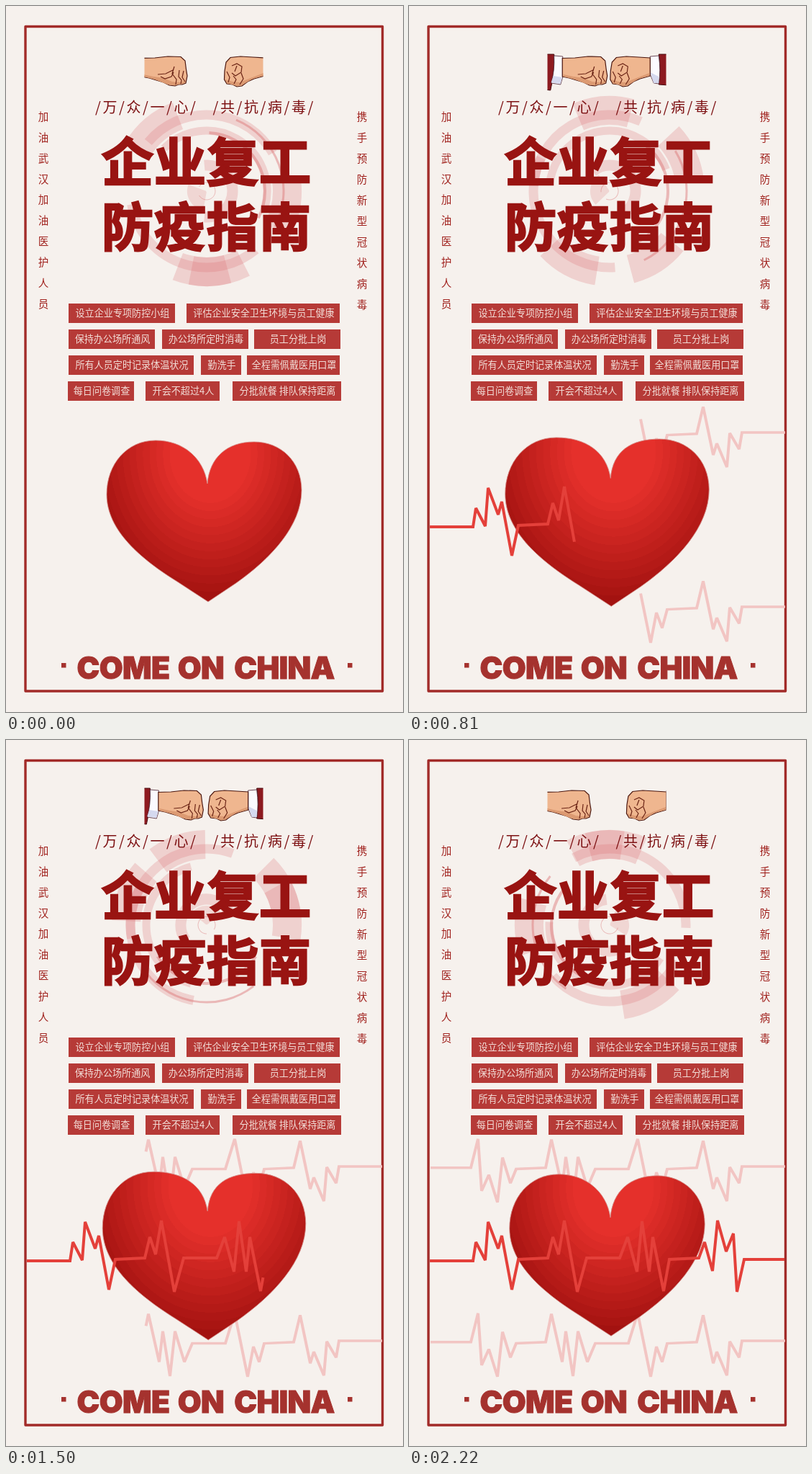
Write an HTML page that moves like this. It is 552 px wide and 980 px high and loops after 2.25 s.

```html
<!DOCTYPE html>
<html lang="zh-CN">
<head>
<meta charset="utf-8">
<style>
html,body{margin:0;width:100%;height:100%;overflow:hidden;background:#f6f1ed}
svg{display:block;width:100vw;height:100vh}
text{font-family:"Noto Sans CJK SC","Noto Sans CJK","Noto Sans SC",sans-serif;text-anchor:middle;white-space:pre}
#title text{font-size:72px;font-weight:900;fill:#991412;stroke:#991412;stroke-width:2.6}
#slogan text{font-size:20px;fill:#7d1012}
#sides text{font-size:14.5px;fill:#a0211d}
#tags rect{fill:#b63a37}
#tags text{font-size:13.1px;font-weight:300;fill:#f3dfd9}
#foot{fill:#a5322e}
#foot text{font:900 42.5px Inter,Roboto,sans-serif;letter-spacing:-.6px;stroke:#a5322e;stroke-width:1}
#rings path{fill:none;stroke:#d86a6c}
.skin{fill:#efb68f;stroke:#4a160e;stroke-width:1.2}
.shade{fill:#dc9a72}
.crease{fill:none;stroke:#6b2415;stroke-width:1.2}
.cuff{fill:#fbfaff;stroke:#4a2030;stroke-width:.8}
.fold{fill:#d5d9ef}
.sleeve{fill:#8d1a20;stroke:#45090d;stroke-width:1}
</style>
</head>
<body>
<svg viewBox="0 0 552 980" preserveAspectRatio="none">
  <defs>
    <clipPath id="window"><rect x="192.5" y="60" width="165" height="62"/></clipPath>
    <radialGradient id="glow" gradientUnits="userSpaceOnUse" cx="0" cy="0" r="1"
      gradientTransform="translate(284 622) scale(168 202)"></radialGradient>
    <polyline id="pulse" fill="none" stroke-width="4" stroke-miterlimit="3"
      points="29,723 89,723 93,697 106,722 110,669 124,706 129,688 143,763 152,721
        193,719 200,690 208,714 216,667 234,766 247,719
        293,719 304,690 317,738 324,668 334,738 339,690 354,765 362,721
        403,719 411,697 422,737 429,667 441,710 451,685 456,766 466,721 522,721"/>
  </defs>
  <rect width="552" height="980" fill="#f6f1ed"/>
  <rect x="27" y="28.5" width="496.5" height="922.5" fill="none" stroke="#a22b29" stroke-width="3.4" stroke-linejoin="round"/>
  <g id="rings"></g>
  <g clip-path="url(#window)">
    <g id="left">
      <path class="sleeve" d="M160 67H199Q200 92 194 117L160 113Z"/>
      <path class="cuff" d="M199 69L211 70V99L208 109L195 107Q200 90 199 69Z"/>
      <path class="fold" d="M198 97L210 99L208 108L195 106Z"/>
      <path class="skin" d="M210.500 72.500L228 72L246 70L264 70.500L270 76L271.500 88L273 97L271 107L266 109L261 109L256 111L248 110L240 106L230 103L220 100L210.500 98Z"/>
      <path class="shade" d="M212 95L226 98L240 100L252 105L262 106L270 104L270 107L256 110L246 109L228 102L212 98Z"/>
      <path class="crease" d="M232 95L243 94L253 89M236 98L242 101L251 98L254 92M255 84L252 94L258 102L257 109M262 89L261 98L265 103L264 108M268 90L266 99L270 105"/>
    </g>
    <g id="right">
      <path class="sleeve" d="M390 67H350Q353 86 350 109L390 112Z"/>
      <path class="cuff" d="M350 69L338 70V95L343 107L350 108Q353 90 350 69Z"/>
      <path class="fold" d="M338 92L350 98L350 107L343 107Z"/>
      <path class="skin" d="M338 72L322 71L305 70L291 71.500L285 78L283 90L282.500 102L286 108L294 109L300 112L307 111L315 105L324 101L338 97Z"/>
      <path class="shade" d="M284 102L294 105L304 106L314 102L337 93L337 97L322 101L307 110L300 111L286 107Z"/>
      <path class="crease" d="M293 83L300 80L307 84L306 92L298 97L293 93M300 83L297 91M286 91L290 99L288 106M295 97L299 102L296 108M306 93L309 101L304 109"/>
    </g>
  </g>
  <g id="slogan"></g>
  <g id="sides"></g>
  <g id="title"></g>
  <g id="tags"></g>
  <g stroke="#f2c5c3">
    <use href="#pulse" transform="translate(552 1235.5) scale(-1 -.89)"/>
    <use href="#pulse" transform="translate(552 1477.5) scale(-1 -.89)"/>
  </g>
  <path id="heart" fill="url(#glow)" stroke="#d5908b" stroke-width=".8"/>
  <use href="#pulse" stroke="#e4403a"/>
  <g id="foot">
    <rect x="77" y="912" width="6.5" height="6.5"/>
    <rect x="475" y="912" width="6.5" height="6.5"/>
    <text x="163" y="934">COME</text>
    <text x="271" y="934">ON</text>
    <text x="387" y="934">CHINA</text>
  </g>
</svg>
<script>
const $ = id => document.getElementById(id);
const LOOP = 2250, STEP = 30;
const SPIN = 360 / 900;   // ring turn, degrees per ms
const PEN = .7;           // pulse line drawn, px per ms

function add(parent, tag, attrs, text) {
  const el = document.createElementNS('http://www.w3.org/2000/svg', tag);
  for (const k in attrs) el.setAttribute(k, attrs[k]);
  if (text) el.textContent = text;
  parent.appendChild(el);
  return el;
}

// single characters at even steps
function spread(id, str, x, y, dx, dy) {
  [...str].forEach((c, i) => add($(id), 'text', {x: x + dx * i, y: y + dy * i}, c));
}
spread('title', '企业复工', 169, 243, 73, 0);
spread('title', '防疫指南', 169, 332.5, 73, 0);
spread('slogan', '/万/众/一/心/', 128, 148, 16.5, 0);
spread('slogan', '/共/抗/病/毒/', 291.5, 148, 16.5, 0);
spread('sides', '加油武汉加油医护人员', 52, 159, 0, 28.85);
spread('sides', '携手预防新型冠状病毒', 495, 159, 0, 28.95);

// rows of labels: left edge, width, text
[
  [[87, 148, '设立企业专项防控小组'], [251, 213, '评估企业安全卫生环境与员工健康']],
  [[87, 120, '保持办公场所通风'], [217, 120, '办公场所定时消毒'], [345, 120, '员工分批上岗']],
  [[87, 174, '所有人员定时记录体温状况'], [271, 56, '勤洗手'], [335, 129, '全程需佩戴医用口罩']],
  [[86, 92, '每日问卷调查'], [194, 103, '开会不超过4人'], [315, 151, '分批就餐 排队保持距离']]
].forEach((row, i) => row.forEach(([x, width, label]) => {
  const y = 413 + 36 * i;
  add($('tags'), 'rect', {x, y, width, height: 27});
  add($('tags'), 'text', {x: x + width / 2 + 1, y: y + 18}, label);
}));

// banded heart shading
const BANDS = 13, bright = [229, 48, 43], dark = [163, 18, 16];
for (let i = 0; i < BANDS; i++) {
  const k = i / (BANDS - 1);
  const color = `rgb(${bright.map((b, j) => Math.round(b + (dark[j] - b) * k))})`;
  const edge = n => n ? .28 + .72 * n / BANDS : 0;
  add($('glow'), 'stop', {offset: edge(i), 'stop-color': color});
  add($('glow'), 'stop', {offset: edge(i + 1), 'stop-color': color});
}

function arc(group, r, width, mid, span, opacity = .24) {
  const a = span / 2 * Math.PI / 180, x = r * Math.cos(a), y = r * Math.sin(a);
  add(group, 'path', {
    d: `M${x} ${-y}A${r} ${r} 0 ${+(span > 180)} 1 ${x} ${y}`,
    'stroke-width': width, opacity, transform: `rotate(${mid})`
  });
}

// two sets of arcs that turn against each other
const cw = add($('rings'), 'g'), ccw = add($('rings'), 'g');
[93, 11].forEach(a => arc(cw, 112, 40, a, 36));
[-130, 82].forEach(a => arc(ccw, 112, 40, a, 38));
arc(cw, 106, 13, -85, 110);
arc(cw, 84, 11, -60, 150);
arc(cw, 36, 15, 0, 190);
arc(cw, 12, 1, 0, 300, .4);
arc(ccw, 106, 13, 110, 120);
arc(ccw, 107, 3, -20, 95, .42);
arc(ccw, 81, 4, -30, 115, .42);
arc(ccw, 14, 26, 150, 100, .2);

function heartPath(n) {
  return `M280 ${n}C275 ${n - 35} 247 603 208 603C168 603 140 636 140 678` +
    `C140 728 188 768 238 799L281 827L320 801C368 767 411 722 411 672` +
    `C411 632 382 605 345 605C307 605 283 ${n - 36} 280 ${n}Z`;
}

function draw(t) {
  const swell = 1 - Math.abs(t / LOOP * 2 - 1);

  cw.setAttribute('transform', `translate(279 257) rotate(${SPIN * t})`);
  ccw.setAttribute('transform', `translate(279 257) rotate(${-SPIN * t})`);

  const reach = 30 * swell * (1.35 - .35 * swell) - 21;
  $('left').setAttribute('transform', `translate(${reach} 0)`);
  $('right').setAttribute('transform', `translate(${-reach} 0)`);

  $('pulse').setAttribute('stroke-dasharray', `${PEN * t} 9999`);

  const notch = 663 - 10 * Math.sin(2 * Math.PI * t / LOOP) ** 2;
  $('heart').setAttribute('d', heartPath(notch));
  $('heart').setAttribute('transform',
    `translate(275.5 690) scale(${1 + .064 * swell}) translate(-275.5 -690)`);
}

const start = performance.now();
function tick() {
  const t = (performance.now() - start) % LOOP;
  draw(Math.floor(t / STEP) * STEP);
  requestAnimationFrame(tick);
}
tick();
</script>
</body>
</html>
```
